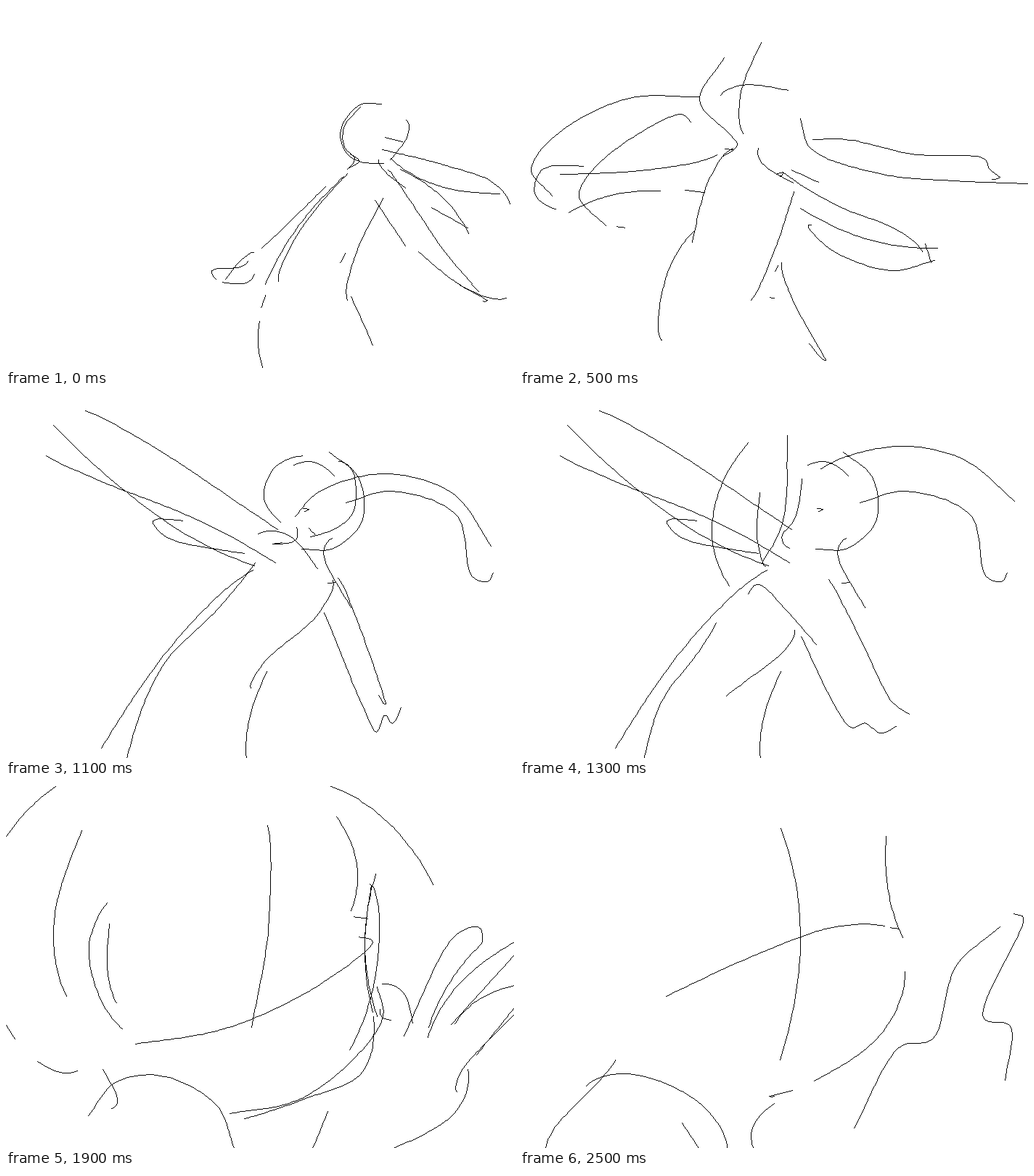
An HTML page with a canvas that plays this animation: 700 px wide and 500 px high, repeating every 2600 ms.

```html
<!DOCTYPE html>
<html lang="en">
<head>
<meta charset="utf-8">
<title>Dancer sketch</title>
<style>
html, body { margin: 0; height: 100%; overflow: hidden; background: #fff; }
canvas { display: block; }
</style>
</head>
<body>
<canvas width="700" height="500"></canvas>
<script>
const ctx = document.querySelector('canvas').getContext('2d');
const LOOP = 2600, STEP = 100, SAMPLES = 96;
const poses = [];

// Strokes with the same part and index flow into each other from pose to pose.
// Each stroke is a smooth curve through a few x, y key points.
const pose = (time, parts) => {
  for (const name in parts) parts[name] = parts[name].map(smooth);
  poses.push({ time, parts });
};

const gap = (a, b) => Math.sqrt(Math.hypot(b[0] - a[0], b[1] - a[1])) || 1;

// Point before a, carrying on the bend of a, b, c
const lead = (a, b, c) => c ? [0, 1].map(n => 3 * a[n] - 3 * b[n] + c[n]) : [2 * a[0] - b[0], 2 * a[1] - b[1]];

// Centripetal spline
function smooth(flat) {
  const pts = [];
  for (let i = 0; i < flat.length; i += 2) pts.push([flat[i], flat[i + 1]]);
  const last = pts.length - 1;
  if (last < 1) return null;
  return Array.from({ length: SAMPLES + 1 }, (_, k) => {
    const pos = k / SAMPLES * last, i = Math.min(last - 1, Math.floor(pos)), u = pos - i;
    const b = pts[i], c = pts[i + 1];
    const a = pts[i - 1] || lead(b, c, last < 4 && pts[i + 2]);
    const d = pts[i + 2] || lead(c, b, last < 4 && pts[i - 1]);
    const ab = gap(a, b), bc = gap(b, c), cd = gap(c, d);
    return [0, 1].map(n => {
      const v = c[n] - b[n];
      const m1 = v + bc * ((b[n] - a[n]) / ab - (c[n] - a[n]) / (ab + bc));
      const m2 = v + bc * ((d[n] - c[n]) / cd - (d[n] - b[n]) / (bc + cd));
      return b[n] + u * (m1 + u * (3 * v - 2 * m1 - m2 + u * (m1 + m2 - 2 * v)));
    });
  });
}

pose(0, {
  head: [
    [517,135, 487,136, 461,170, 468,202, 490,215, 520,217],
    [551,157, 554,175, 529,212],
    [],
    [522,181, 546,187],
    [488,139, 466,165, 466,195, 486,214, 473,223],
    [474,204, 480,211, 470,225]
  ],
  hair: [
    [], [],
    [518,198, 610,221, 670,243, 694,273],
    [530,210, 590,246, 680,259],
    [543,225, 601,264, 637,314],
    [586,278, 636,306]
  ],
  left: [
    [440,249, 388,300, 352,334],
    [333,352, 322,360, 283,365, 289,377],
    [341,340, 325,349, 302,377],
    [298,381, 329,382, 342,370]
  ],
  right: [
    [526,226, 552,262, 600,333, 642,383],
    [568,339, 640,393, 689,403],
    [625,385, 665,408, 657,407],
    [513,212, 519,225, 550,251],
    [508,268, 550,331],
    [641,384, 651,394]
  ],
  body: [
    [465,235, 400,307, 357,384],
    [519,265, 478,352, 470,406],
    [475,401, 505,468],
    [349,435, 347,465, 353,500],
    [470,231, 400,317, 375,380],
    [357,399, 351,416],
    [467,341, 460,354]
  ]
});

pose(500, {
  head: [
    [281,71, 247,130, 291,179, 299,192, 277,209],
    [],
    [332,50, 303,125, 307,176],
    [276,123, 305,109, 369,116],
    [282,197, 293,198]
  ],
  hair: [
    [44,262, 15,225, 55,173, 150,127, 247,125],
    [118,303, 81,262, 110,215, 222,149, 235,160],
    [403,184, 450,184, 540,204, 640,211, 645,223, 661,237, 650,239],
    [386,155, 400,196, 500,232, 600,241, 700,245]
  ],
  left: [
    [271,205, 190,224, 55,232],
    [87,221, 30,226, 20,260, 49,280],
    [193,255, 125,261, 67,285],
    [227,254, 254,257],
    [133,304, 144,306]
  ],
  right: [
    [361,229, 440,277, 518,308, 554,339],
    [386,279, 480,322, 575,334],
    [401,302, 396,303, 430,337, 510,365, 571,351],
    [328,196, 332,215, 376,244],
    [374,226, 411,243],
    [558,328, 566,354],
    [354,231, 365,229, 358,235]
  ],
  body: [
    [293,196, 262,235, 237,326],
    [377,256, 345,350, 318,406],
    [360,354, 375,405, 421,491, 398,466],
    [241,309, 206,360, 190,435, 195,461],
    [355,358, 351,366],
    [344,402, 350,403]
  ]
});

pose(700, {
  head: [
    [341,87, 318,130, 340,169, 339,182, 327,187],
    [],
    [374,66, 348,118, 344,157],
    [327,111, 370,101, 412,113],
    [328,94, 312,130, 330,160]
  ],
  hair: [
    [79,49, 150,117, 210,149, 312,164],
    [125,108, 180,131, 280,144, 345,134],
    [416,165, 470,144, 525,157, 563,209, 595,281, 639,297],
    [483,181, 540,197, 564,265, 619,314]
  ],
  left: [
    [315,192, 220,239, 151,269],
    [164,271, 112,297, 177,293, 187,279],
    [203,269, 193,273]
  ],
  right: [
    [384,195, 430,209, 485,268, 562,331],
    [389,238, 460,283, 567,361],
    [587,366, 584,372, 603,382, 605,377],
    [387,175, 381,187]
  ],
  body: [
    [230,292, 198,385, 184,479],
    [405,239, 395,278, 343,319, 337,328],
    [336,336, 333,406],
    [],
    [348,401, 362,431]
  ]
});

pose(1100, {
  head: [
    [408,82, 370,98, 355,140, 378,174],
    [445,77, 485,112, 490,172, 450,210, 407,211],
    [400,181, 398,199, 367,204, 380,202],
    [396,95, 424,91, 452,110],
    [458,90, 477,103, 475,165, 419,194],
    [417,182, 425,191],
    [409,155, 417,156, 411,159]
  ],
  hair: [
    [65,40, 160,128, 250,192, 342,234],
    [55,82, 130,117, 260,169, 371,230],
    [398,166, 430,132, 520,107, 615,134, 668,207],
    [468,147, 530,131, 620,164, 642,249, 664,255, 671,244]
  ],
  left: [
    [374,184, 330,154, 200,68, 109,20],
    [243,172, 202,172, 220,194, 328,217]
  ],
  right: [
    [457,251, 480,301, 523,428, 513,413],
    [438,299, 492,430, 510,464, 522,440, 532,452, 544,430],
    [],
    [347,190, 385,190, 429,238],
    [449,196, 437,215, 475,292]
  ],
  body: [
    [343,230, 290,295, 215,373, 166,500],
    [450,254, 430,300, 353,370, 337,403],
    [359,380, 335,445, 331,500],
    [],
    [340,240, 240,330, 131,486],
    [443,258, 453,257]
  ]
});

pose(1600, {
  head: [
    [172,38, 127,230, 153,395],
    [],
    [370,13, 351,150, 357,222],
    [],
    [234,0, 195,130, 204,283],
    [200,60, 186,210, 206,305, 207,300]
  ],
  hair: [
    [], [],
    [437,0, 500,10, 585,15, 700,51]
  ],
  right: [
    [377,256, 455,370, 570,477],
    [311,381, 390,459, 478,495],
    [],
    [265,398, 263,369, 320,442, 377,500]
  ],
  body: [
    [160,438, 178,500],
    [270,426, 255,432, 205,430]
  ]
});

pose(2100, {
  head: [
    [59,77, 24,170, 37,220],
    [511,277, 519,318, 480,375, 400,434, 308,452],
    [354,82, 369,210, 325,407],
    [178,356, 300,335, 425,278, 505,214, 486,208],
    [76,268, 55,305, 85,363, 130,370],
    [104,277, 116,298],
    [506,318, 490,395, 410,432, 328,459],
    [43,380, 75,395, 98,393],
    [68,0, 30,32, 0,69],
    [0,330, 12,349]
  ],
  hair: [
    [], [],
    [453,0, 500,40, 532,125, 513,192]
  ],
  temple: [
    [455,42, 483,107, 475,172],
    [479,180, 498,183],
    [509,121, 494,220, 511,318],
    [501,135, 513,170, 506,275, 473,364],
    [503,137, 494,230, 505,312]
  ],
  shoulder: [
    [113,455, 150,409, 215,400, 290,441, 314,500],
    [133,391, 153,435, 145,445]
  ],
  hand: [
    [655,217, 652,195, 620,205, 548,345],
    [518,273, 545,283, 560,327],
    [655,217, 610,272, 582,333],
    [581,347, 622,275, 700,215],
    [700,233, 613,329],
    [618,328, 650,295, 700,275],
    [648,371, 700,306],
    [700,315, 623,400, 621,422],
    [636,391, 620,448, 533,500],
    [443,449, 422,500],
    [530,323, 517,318, 515,308]
  ]
});

pose(2500, {
  head: [
    [],
    [530,256, 501,337, 405,407],
    [359,58, 386,210, 358,378],
    [201,290, 340,226, 430,195, 502,193],
    [], [],
    [375,420, 342,429, 350,428]
  ],
  temple: [
    [504,69, 507,145, 527,209],
    [510,195, 522,197]
  ],
  shoulder: [
    [91,414, 150,397, 250,440, 285,500],
    [131,378, 112,403, 45,475, 36,500],
    [350,438, 321,468, 321,500],
    [223,465, 246,500]
  ],
  hand: [
    [661,194, 600,249, 568,349, 523,360, 460,472],
    [680,176, 693,181, 638,320, 675,331, 668,406]
  ]
});

// One pixel wide line without smoothing, laid in runs of a few pixels
function ink(stroke) {
  let [x0, y0] = stroke[0].map(Math.round);
  stroke.forEach((point, i) => {
    const [x1, y1] = point.map(Math.round);
    const n = Math.max(Math.abs(x1 - x0), Math.abs(y1 - y0));
    if (n < 4 && i < SAMPLES) return;
    for (let k = 0; k <= n; k++) {
      const u = n ? k / n : 0;
      ctx.fillRect(Math.round(x0 + (x1 - x0) * u), Math.round(y0 + (y1 - y0) * u), 1, 1);
    }
    [x0, y0] = [x1, y1];
  });
}

const blend = (a, b, u) => a.map(([x, y], i) => [x + (b[i][0] - x) * u, y + (b[i][1] - y) * u]);

function draw(time) {
  const i = poses.findLastIndex(p => p.time <= time);
  const a = poses[i], b = poses[i + 1] || a;
  const u = a === b ? 0 : (time - a.time) / (b.time - a.time);
  const near = u < 0.5 ? a : b;
  ctx.fillStyle = '#fff';
  ctx.fillRect(0, 0, 700, 500);
  ctx.fillStyle = '#000';
  for (const name in near.parts) near.parts[name].forEach((stroke, k) => {
    const from = a.parts[name]?.[k], to = b.parts[name]?.[k];
    if (stroke) ink(from && to ? blend(from, to, u) : stroke);
  });
}

function tick() {
  const time = performance.now() % LOOP;
  draw(Math.floor(time / STEP) * STEP);
  requestAnimationFrame(tick);
}
tick();
</script>
</body>
</html>
```
